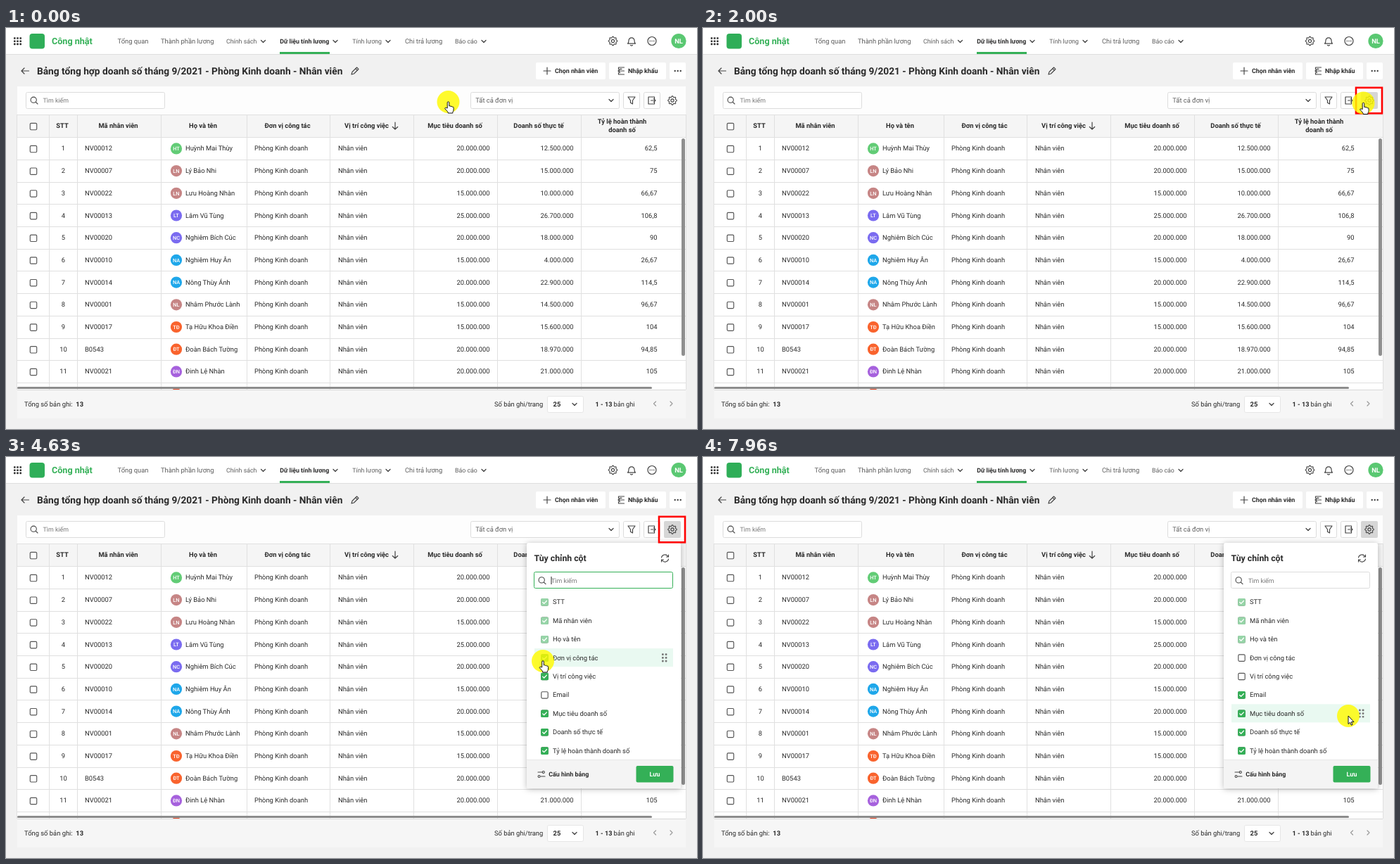
Recreate the animation shown at these times as an HTML page. Size 982 px wide and 570 px high, loop 8 s.

```html
<!DOCTYPE html>
<html lang="vi">
<head>
<meta charset="utf-8">
<style>
html, body { margin: 0; width: 100%; height: 100%; overflow: hidden; background: #f1f1f1 }
svg { display: block; width: 100vw; height: 100vh; font-family: Roboto, sans-serif; text-rendering: geometricPrecision }
.l { fill: none; stroke-linecap: round; stroke-linejoin: round }
</style>
</head>
<body>
<svg id="stage" viewBox="0 0 982 570"></svg>
<script>
const INK = '#2a2a2a', GREY = '#5c5c5c', GREEN = '#34b057', BORDER = '#dcdcdc';

// y is the middle of the capitals
const text = (x, y, s, size = 9.38, fill = INK, weight = 400, anchor = 'start') =>
  `<text x="${x}" y="${(y + size * .36).toFixed(2)}" font-size="${size}" fill="${fill}" font-weight="${weight}" text-anchor="${anchor}">${s}</text>`;
const bold = (x, y, s, size, anchor, fill = INK) => text(x, y, s, size, fill, 700, anchor);
const rect = (x, y, w, h, fill, r = 0, more = '') =>
  `<rect x="${x}" y="${y}" width="${w}" height="${h}" rx="${r}" fill="${fill}" ${more}/>`;
const frame = (x, y, w, h, id = '', stroke = BORDER) =>
  rect(x + .5, y + .5, w - 1, h - 1, '#fff', 2, `stroke="${stroke}" ${id && `id="${id}"`}`);
const line = (x, y, d, color = '#444', w = 1.2, more = '') =>
  `<path class="l" transform="translate(${x} ${y})" d="${d}" stroke="${color}" stroke-width="${w}" ${more}/>`;
const dot = (x, y, r, fill) => `<circle cx="${x}" cy="${y}" r="${r}" fill="${fill}"/>`;
const ring = (x, y, r, color = '#444', w = 1.2) =>
  `<circle cx="${x}" cy="${y}" r="${r}" fill="none" stroke="${color}" stroke-width="${w}"/>`;
const chevron = (x, y, more = '') => line(x, y, 'M-3-1.5L0 1.5L3-1.5', '#444', 1.3, more);
const lens = (x, y) => ring(x - .8, y - .8, 4.1, '#444', 1.1) + line(x, y, 'M2.2 2.2L5 5', '#444', 1.1);
const box = (x, y) => rect(x - 4.7, y - 4.7, 9.4, 9.4, '#fff', 1.5, 'stroke="#555" stroke-width="1.15"');
const tick = (x, y, fill) => rect(x - 5.3, y - 5.3, 10.6, 10.6, fill, 1.5) +
  line(x, y, 'M-2.8 .1L-.9 2L2.9-1.9', '#fff', 1.3);
const range = n => [...Array(n).keys()];

function gear(x, y) {
  const pts = range(32).map(i => {
    const r = i % 4 < 2 ? 6.2 : 4.9, a = (i - .5) * Math.PI / 16;
    return (r * Math.cos(a)).toFixed(2) + ' ' + (r * Math.sin(a)).toFixed(2);
  });
  return line(x, y, `M${pts.join('L')}Z`, '#444', 1.1) + ring(x, y, 2.1, '#444', 1.1);
}

function topBar() {
  let s = rect(0, 0, 982, 37.5, '#fff') + rect(0, 37, 982, 1, '#dedede');
  for (const i of range(9)) s += rect(11 + i % 3 * 4.2, 13.2 + (i / 3 | 0) * 4.2, 2.6, 2.6, '#333', .6);
  s += rect(33.5, 8, 21.5, 21.5, '#2fae58', 4) + bold(65, 18.5, 'Công nhật', 12.6, 'start', GREEN);
  for (const [x, label, arrow] of [[158.5, 'Tổng quan'], [220, 'Thành phần lương'], [313, 'Chính sách', 365.5],
    [492.3, 'Tính lương', 543], [567, 'Chi trả lương'], [638, 'Báo cáo', 679]])
    s += text(x, arrow ? 19.3 : 18.7, label, arrow ? 8.8 : 9.38, GREY) + (arrow ? chevron(arrow, 19) : '');
  s += bold(389.3, 19.3, 'Dữ liệu tính lương', 8.8) + chevron(468, 19) + rect(389, 34, 71, 3, GREEN);
  s += gear(862.5, 18.5) + line(889, 19, 'M-5.5 3.2Q-4 2-4-1.2A4 4 0 0 1 4-1.2Q4 2 5.5 3.2ZM-1.5 5.5Q0 6.6 1.5 5.5');
  s += ring(918, 18.5, 6) + [-2.7, 0, 2.7].map(d => dot(918 + d, 18.5, .8, '#444')).join('');
  return s + dot(956, 18.5, 10.6, '#5ac872') + bold(956, 18.5, 'NL', 9.4, 'middle', '#fff');
}

function titleRow() {
  return line(27, 61, 'M5.5 0H-5M-1-4L-5 0L-1 4') +
    bold(44, 61, 'Bảng tổng hợp doanh số tháng 9/2021 - Phòng Kinh doanh - Nhân viên', 13.72) +
    line(496, 61, 'M-5 5L-4 1.5L2.5-5L5-2.5L-1.5 4ZM.8-3.3L3.3-.8', '#444', 1.1) +
    rect(753, 49, 99, 24, '#fff', 2) + line(769, 61, 'M-5 0H5M0-5V5') +
    text(780, 61, 'Chọn nhân viên', 8.85, INK, 600) +
    rect(857, 49, 81, 24, '#fff', 2) + line(874, 61, 'M4.5-5H-3.5V-2.5M-3.5 2.5V5H4.5M4.5 0H-4M-1-2.6L1-2.6M-1.5-2.5L-4 0L-1.5 2.5') +
    text(884, 61, 'Nhập khẩu', 8.85, INK, 600) +
    rect(943, 49, 23, 24, '#fff', 2) + [950.7, 954.7, 958.7].map(x => dot(x, 61, 1.2, '#444')).join('');
}

function toolbar() {
  return rect(16, 83, 950, 41, '#fdfdfd') + frame(28, 91, 198, 24) + lens(40, 103) +
    text(52.5, 103, 'Tìm kiếm', 8.86, '#777') +
    frame(660, 91, 212, 24, 'unit') + text(667.3, 102.8, 'Tất cả đơn vị', 9.35, GREY) + chevron(860, 103, 'id="unitArrow"') +
    frame(877, 91, 24, 24, 'filter') + line(889, 103, 'M-5-5H5L1.5 0V5L-1.5 3.3V0Z') +
    frame(906, 91, 24, 24, 'export') + line(918, 103, 'M3.5-2.5V-5H-5V5H3.5V2.5M-1.5 0H5M2.6-2.4L5 0L2.6 2.4') +
    rect(935, 91, 24, 24, '#d6d6d6', 2, 'id="gearBack"') + gear(947, 103);
}

const people = [
  ['HT', '#62cc76', 'NV00012', 'Huỳnh Mai Thùy', '20.000.000', '12.500.000', '62,5'],
  ['LN', '#c68585', 'NV00007', 'Lý Bảo Nhi', '20.000.000', '15.000.000', '75'],
  ['LN', '#c68585', 'NV00022', 'Lưu Hoàng Nhàn', '15.000.000', '10.000.000', '66,67'],
  ['LT', '#7a6bf0', 'NV00013', 'Lâm Vũ Tùng', '25.000.000', '26.700.000', '106,8'],
  ['NC', '#7a6bf0', 'NV00020', 'Nghiêm Bích Cúc', '20.000.000', '18.000.000', '90'],
  ['NA', '#1ea7ea', 'NV00010', 'Nghiêm Huy Ân', '15.000.000', '4.000.000', '26,67'],
  ['NA', '#1ea7ea', 'NV00014', 'Nông Thùy Ánh', '20.000.000', '22.900.000', '114,5'],
  ['NL', '#c68585', 'NV00001', 'Nhâm Phước Lành', '15.000.000', '14.500.000', '96,67'],
  ['TĐ', '#f9632d', 'NV00017', 'Tạ Hữu Khoa Điền', '15.000.000', '15.600.000', '104'],
  ['ĐT', '#f9632d', 'B0543', 'Đoàn Bách Tường', '20.000.000', '18.970.000', '94,85'],
  ['ĐN', '#a661dd', 'NV00021', 'Đinh Lệ Nhàn', '20.000.000', '21.000.000', '105']];

function table() {
  let s = rect(16, 123, 950, 391, '#fff') + rect(16, 123, 950, 32, '#f5f5f5');
  for (const y of [123, 155, ...range(11).map(i => Math.floor(187.4 + 31.7 * i))]) s += rect(16, y, 950, 1, '#e0e0e0');
  for (const x of [15, 61, 101, 220, 342, 460, 579, 698, 817, 966]) s += rect(x, 123, 1, 391, '#e0e0e0');
  s += box(39, 140);
  for (const [x, y, label] of [[80, 139, 'STT'], [159.5, 139, 'Mã nhân viên'], [280, 139, 'Họ và tên'],
    [400, 139, 'Đơn vị công tác'], [512.5, 139, 'Vị trí công việc'], [638, 139, 'Mục tiêu doanh số'],
    [757, 139, 'Doanh số thực tế'], [875.5, 132.5, 'Tỷ lệ hoàn thành'], [875.5, 145, 'doanh số']])
    s += bold(x, y, label, 9.38, 'middle');
  s += line(553, 139, 'M0-5V5M-3.7 1.5L0 5L3.7 1.5');
  people.forEach(([initials, color, code, name, goal, actual, rate], i) => {
    const y = 171.1 + 31.7 * i, right = (x, v) => text(x, y, v, 9.38, INK, 400, 'end');
    s += box(39, y + .9) + text(81.5, y, i + 1, 9.38, INK, 400, 'middle') + text(112, y, code) +
      dot(242, y + .3, 8.1, color) + text(242, y + .4, initials, 7.4, '#fff', 500, 'middle') + text(255, y, name) +
      text(353, y, 'Phòng Kinh doanh') + text(472, y, 'Nhân viên') + right(687.5, goal) + right(806.5, actual) + right(925.5, rate);
  });
  s += dot(242, 520, 8.1, '#f0502f') + rect(16, 510, 902, 3, '#8c8c8c', 1.5) + rect(960, 157, 5, 309, '#8f8f8f', 2.5);
  return s + rect(16, 514, 950, 41, '#f6f6f6') + rect(16, 514, 950, 1, '#d8d8d8');
}

function footer() {
  return text(26, 534.5, 'Tổng số bản ghi:') + bold(99.3, 534.5, '13', 9.4) + text(694, 535, 'Số bản ghi/trang') +
    frame(769, 523, 52, 24, '', '#e6e6e6') + bold(777.5, 535, '25', 9.4) + chevron(808, 535) +
    bold(837.5, 534.5, '1 - 13', 9.2) + text(863.5, 534.5, 'bản ghi', 9.2) +
    line(922, 534, 'M1.5-3L-1.5 0L1.5 3', '#999') + line(945.5, 534, 'M-1.5-3L1.5 0L-1.5 3', '#999');
}

const STEP = 26.4, TOP = 192.9;
const items = ['STT', 'Mã nhân viên', 'Họ và tên', 'Đơn vị công tác', 'Vị trí công việc', 'Email',
  'Mục tiêu doanh số', 'Doanh số thực tế', 'Tỷ lệ hoàn thành doanh số'];

function popup() {
  let s = rect(740, 122, 219, 349, '#fff', 3, 'style="filter:drop-shadow(0 1px 4px #0004)"') +
    bold(750.5, 143.7, 'Tùy chỉnh cột', 12.27) +
    line(936.5, 144, 'M-5-1A5 5 0 0 1 4-3L5-2M5-5V-2H2M5 1A5 5 0 0 1-4 3L-5 2M-5 5V2H-2', '#444', 1.1) +
    frame(750, 163, 198, 24, 'search') + lens(762, 175.7) + text(775, 175.5, 'Tìm kiếm', 8.86, '#777') +
    rect(774.5, 170, 1, 11, '#222', 0, 'id="caret"');
  s += '<g id="hover">' + rect(751, 0, 197, 26, '#e9f9f1') +
    range(6).map(i => rect(932 + i % 2 * 4.7, 7.2 + (i >> 1) * 4.7, 2.7, 2.7, '#777', .8)).join('') + '</g>';
  items.forEach((label, i) => {
    const y = 206 + STEP * i;
    s += box(765.5, y + .4) + `<g id="tick${i}">${tick(765.5, y + .4, i < 3 ? '#97d5a8' : GREEN)}</g>` + text(777, y, label);
  });
  return s + rect(740, 430, 219, 41, '#f4f4f4', 3) + rect(740, 430, 219, 1, '#e8e8e8') +
    line(761, 451, 'M-5-3H1M-1 3H5', '#444', 1.1) + ring(763.8, 448, 1.5, '#444', 1.1) + ring(757.6, 454, 1.5, '#444', 1.1) +
    text(771.3, 451, 'Cấu hình bảng', 8.85, INK, 600) +
    rect(895.5, 439, 53, 23.5, GREEN, 2) + bold(922, 451, 'Lưu', 8.8, 'middle', '#fff');
}

const pointer = `<g id="pointer">${dot(0, 0, 16, '#fffa00').replace('/>', ' opacity=".82"/>')}
  <g fill="#fff" stroke="#111" stroke-width="1" stroke-linejoin="round">
  <path id="hand" d="M-1.3 9V1.1a1.3 1.3 0 0 1 2.6 0V6q1.4-.9 2.2.5q1.4-.8 2.2.6q1.9-.4 1.9 1.4V11q0 2-1.2 3.4V16H-.3V14.8Q-2-.0-2 12.600L-4.800 9.600q.2-1.900 2-1.100Z"/>
  <path id="arrow" d="M0 0V11.500L2.600 9.200L4.300 13.200L6 12.400L4.400 8.600H8Z"/></g></g>`.replace('Q-2-.0-2 12.600', 'L-2 12.6');

stage.innerHTML = topBar() + titleRow() + toolbar() + table() + footer() + `<g id="popup">${popup()}</g>` +
  rect(928, 84.800, 37, 36.500, 'none', 0, 'id="mark" stroke="#f00" stroke-width="2.6"') + pointer;

const $ = id => document.getElementById(id);
const show = (id, on) => $(id).style.display = on ? '' : 'none';
const clamp = v => Math.max(0, Math.min(1, v));

// time, x, y, easing into this point
const smooth = k => k * k * (3 - 2 * k), rise = k => k ** 1.3, settle = k => 1 - (1 - k) ** 2;
const path = [
  [1110, 628.5, 105], [1500, 871, 106, rise], [1800, 938.5, 106.5, settle],
  [3350, 938.5, 106.5], [3800, 804, 191, rise], [4160, 766, 264, settle],
  [4190, 766, 264], [4460, 763, 290, smooth], [4900, 763, 290], [5530, 768.5, 315, smooth],
  [6630, 768.5, 315], [6660, 768.5, 322], [6860, 768, 337, settle],
  [7470, 768, 337], [7760, 896, 367, smooth], [7900, 896, 367], [7960, 917, 368]];

function place(t) {
  const i = path.findIndex(p => p[0] > t);
  if (i < 1) return (i ? path.at(-1) : path[0]).slice(1, 3);
  const [t0, x0, y0] = path[i - 1], [t1, x1, y1, ease = k => k] = path[i];
  const k = ease((t - t0) / (t1 - t0));
  return [x0 + (x1 - x0) * k, y0 + (y1 - y0) * k];
}

function draw(t) {
  const [x, y] = place(t), open = t >= 2460;
  const stroke = (id, on) => $(id).setAttribute('stroke', on ? GREEN : BORDER);
  const unitOn = x > 660 && x < 872 && !open;
  stroke('unit', unitOn);
  $('unitArrow').setAttribute('stroke', unitOn ? GREEN : '#444');
  stroke('filter', x > 877 && x < 901 && !open);
  stroke('export', x > 906 && t < 1960);
  show('gearBack', t >= 1960);
  show('popup', open);
  stroke('search', t < 4930);
  show('caret', t < 4930);
  const row = Math.floor((y - TOP) / STEP);
  show('hover', row >= 0);
  $('hover').setAttribute('transform', `translate(0 ${TOP + STEP * row})`);
  show('tick3', t < 4665);
  show('tick4', t < 6700);
  show('tick5', t >= 7330);
  $('mark').setAttribute('opacity', Math.min(clamp(t / 830), clamp((5530 - t) / 600)));
  $('pointer').setAttribute('transform', `translate(${x} ${y})`);
  const arrow = open && x > 775 && y > 120;
  show('arrow', arrow);
  show('hand', !arrow);
}

const start = performance.now();
(function tickFrame() {
  draw((performance.now() - start) % 8000);
  requestAnimationFrame(tickFrame);
})();
</script>
</body>
</html>
```
